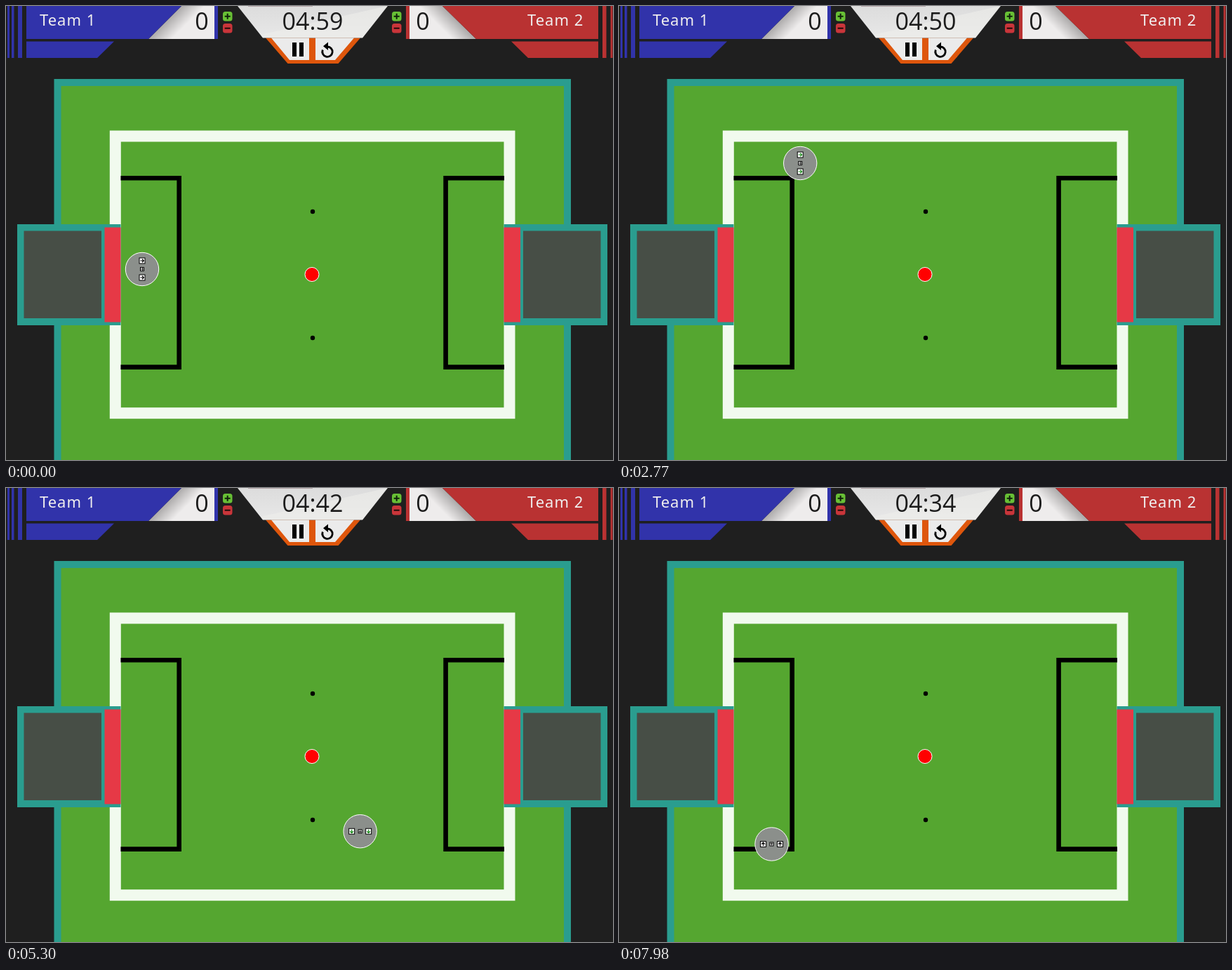
Recreate the animation shown at these times as an HTML page. Size 865x647 px, loop 8000 ms.

```html
<!DOCTYPE html>
<html lang="en">
<head>
<meta charset="utf-8">
<title>Robot soccer field</title>
<style>
html, body { margin: 0; width: 100%; height: 100%; overflow: hidden; background: #1f1f1f; }
svg { display: block; width: 100vw; height: 100vh; }
text { font-family: "Open Sans", "Noto Sans", sans-serif; }
.digits { font-size: 34px; fill: #1c1c1c; text-anchor: middle; }
.team { font: 500 22px "Noto Sans", "Open Sans", sans-serif; letter-spacing: 1px; fill: #f0eeee; }
</style>
</head>
<body>
<svg viewBox="0 0 865 647">
  <defs>
    <linearGradient id="shadeL" gradientUnits="userSpaceOnUse" x1="226" y1="23" x2="243" y2="40">
      <stop offset="0" stop-color="#aaa8a8"/><stop offset="1" stop-color="#eeecec"/>
    </linearGradient>
    <linearGradient id="shadeR" gradientUnits="userSpaceOnUse" x1="646" y1="23" x2="629" y2="40">
      <stop offset="0" stop-color="#aaa8a8"/><stop offset="1" stop-color="#eeecec"/>
    </linearGradient>
    <linearGradient id="shadeC" x1="0" y1="0" x2="0" y2="1">
      <stop offset="0" stop-color="#dcdcdc"/><stop offset="1" stop-color="#e8e8e8"/>
    </linearGradient>
    <g id="buttons">
      <rect y="8" width="13.5" height="13.5" rx="3.5" fill="#68c035"/>
      <path d="M2.7 14.7h8M6.7 10.7v8" stroke="#10200a" stroke-width="2"/>
      <rect y="25" width="13.5" height="13.5" rx="3.5" fill="#c9353a"/>
      <path d="M2.7 31.7h8" stroke="#200a0a" stroke-width="2"/>
    </g>
    <g id="wheel">
      <rect x="-4" y="-4" width="8" height="8" fill="#fff" stroke="#000"/>
      <path d="M-2.5 0H2.5M0 -2.3L2.3 0L0 2.3" fill="none" stroke="currentColor" stroke-width="1.2"/>
    </g>
  </defs>

  <rect width="865" height="647" fill="#1f1f1f"/>

  <!-- field -->
  <rect x="68.5" y="104" width="736.5" height="560" fill="#2a9d8f"/>
  <rect x="78.5" y="114" width="716.5" height="560" fill="#55a630"/>
  <rect x="155.8" y="185.5" width="561.7" height="394.7" fill="none" stroke="#f1faee" stroke-width="16"/>
  <g fill="none" stroke="#000" stroke-width="6.6">
    <path d="M163.5 245.3H246.7V514.6H163.5"/>
    <path d="M710 245.3H626.6V514.6H710"/>
  </g>
  <g fill="#2a9d8f">
    <rect x="16" y="311" width="147.5" height="144"/>
    <rect x="709.5" y="311" width="147.5" height="144"/>
  </g>
  <g fill="#474e46">
    <rect x="25.5" y="320.5" width="110.5" height="124.5"/>
    <rect x="737" y="320.5" width="110.5" height="124.5"/>
  </g>
  <g fill="#e63946">
    <rect x="140.5" y="315.5" width="23" height="135"/>
    <rect x="709.5" y="315.5" width="23.5" height="135"/>
  </g>
  <circle cx="437" cy="293" r="3.2"/>
  <circle cx="437" cy="473" r="3.2"/>
  <circle cx="436" cy="382.5" r="10" fill="#f00" stroke="#fff"/>

  <g id="robot">
    <circle r="23.7" fill="#8b8f8b" stroke="#fff"/>
    <g id="wheels">
      <use href="#wheel" y="-12"/>
      <use href="#wheel" y="12"/>
      <rect x="-2.5" y="-2.5" width="5" height="5" fill="#fff" stroke="#000"/>
      <path d="M-2 0H2M.5 -2V2" stroke="#000" stroke-width=".9"/>
    </g>
  </g>

  <!-- scoreboard -->
  <path d="M250 0H297V47H203Z" fill="url(#shadeL)"/>
  <path d="M622 0H575V47H670Z" fill="url(#shadeR)"/>
  <path d="M29 0H250L203 47H29ZM29 50.5H154L130 74H29ZM297 0H302V47H297ZM2 0h3v74h-3ZM8 0h3.5v74h-3.5ZM17 0h6v74h-6Z" fill="#3133aa"/>
  <path d="M844 0H622L670 47H844ZM844 50.5H720L744 74H844ZM570 0H575V47H570ZM850 0h5.5v74h-5.5ZM861.5 0h3v74h-3Z" fill="#b93232"/>
  <text class="team" x="48" y="27.5">Team 1</text>
  <text class="team" x="743" y="27.5">Team 2</text>
  <text class="digits" x="279" y="34">0</text>
  <text class="digits" x="594" y="34">0</text>
  <use href="#buttons" x="309"/>
  <use href="#buttons" x="550"/>

  <path d="M370 45.5H505L473.5 82H401.500Z" fill="#de560c"/>
  <path d="M378 45.5H432V77H404ZM441 45.5H496L469 77H441Z" fill="#ebebeb"/>
  <path d="M330 0H544L508 45.5H366Z" fill="url(#shadeC)"/>
  <path d="M543 0L508 45H366L363 41Z" fill="#efeeec" opacity=".6"/>
  <path d="M345 .5H437" stroke="#b3a5a8"/>
  <path d="M408 52h6v20h-6ZM418 52h6v20h-6Z"/>
  <path d="M451.300 62.500A7.200 7.200 0 1 0 458 58" fill="none" stroke="#000" stroke-width="2.800"/>
  <path d="M459 51.500V63L452 57.200Z"/>
  <text class="digits" id="clock" x="437" y="34">04:59</text>
</svg>
<script>
const LOOP = 8000;
// time (ms), x, y, heading (degrees)
const path = [
  [0, 194, 375, 0],
  [40, 194, 375, 0],
  [190, 219.5, 375, 0],
  [1042, 219.5, 375, -90],
  [1794, 219.5, 224, -90],
  [2644, 219.5, 224, 0],
  [3585, 506.5, 224, 0],
  [4431, 506.5, 224, 90],
  [5374, 504.5, 511.5, 90],
  [6236, 504.5, 511.5, 180],
  [7170, 217.5, 507.5, 180],
  [7960, 217.5, 507.5, 270],
  [LOOP, 217.5, 507.5, 270]
];
const robot = document.getElementById("robot");
const wheels = document.getElementById("wheels");
const clock = document.getElementById("clock");

function pose(t) {
  const i = path.findIndex(p => p[0] > t);
  const a = path[i - 1], b = path[i];
  const k = (t - a[0]) / (b[0] - a[0]);
  const [, x, y, angle] = a.map((v, j) => v + (b[j] - v) * k);
  return { x, y, angle, driving: a[1] !== b[1] || a[2] !== b[2] };
}

function clockText(t) {
  const left = 59 - Math.floor(0.35 + t * 0.00315);
  return "04:" + String(left).padStart(2, "0");
}

function draw(t) {
  const { x, y, angle, driving } = pose(t);
  robot.setAttribute("transform", `translate(${x} ${y})`);
  wheels.setAttribute("transform", `rotate(${angle})`);
  wheels.setAttribute("color", driving ? "#178a17" : "#000");
  clock.textContent = clockText(t);
}

const start = performance.now();
function tick() {
  draw((performance.now() - start) % LOOP);
  requestAnimationFrame(tick);
}
tick();
</script>
</body>
</html>
```
